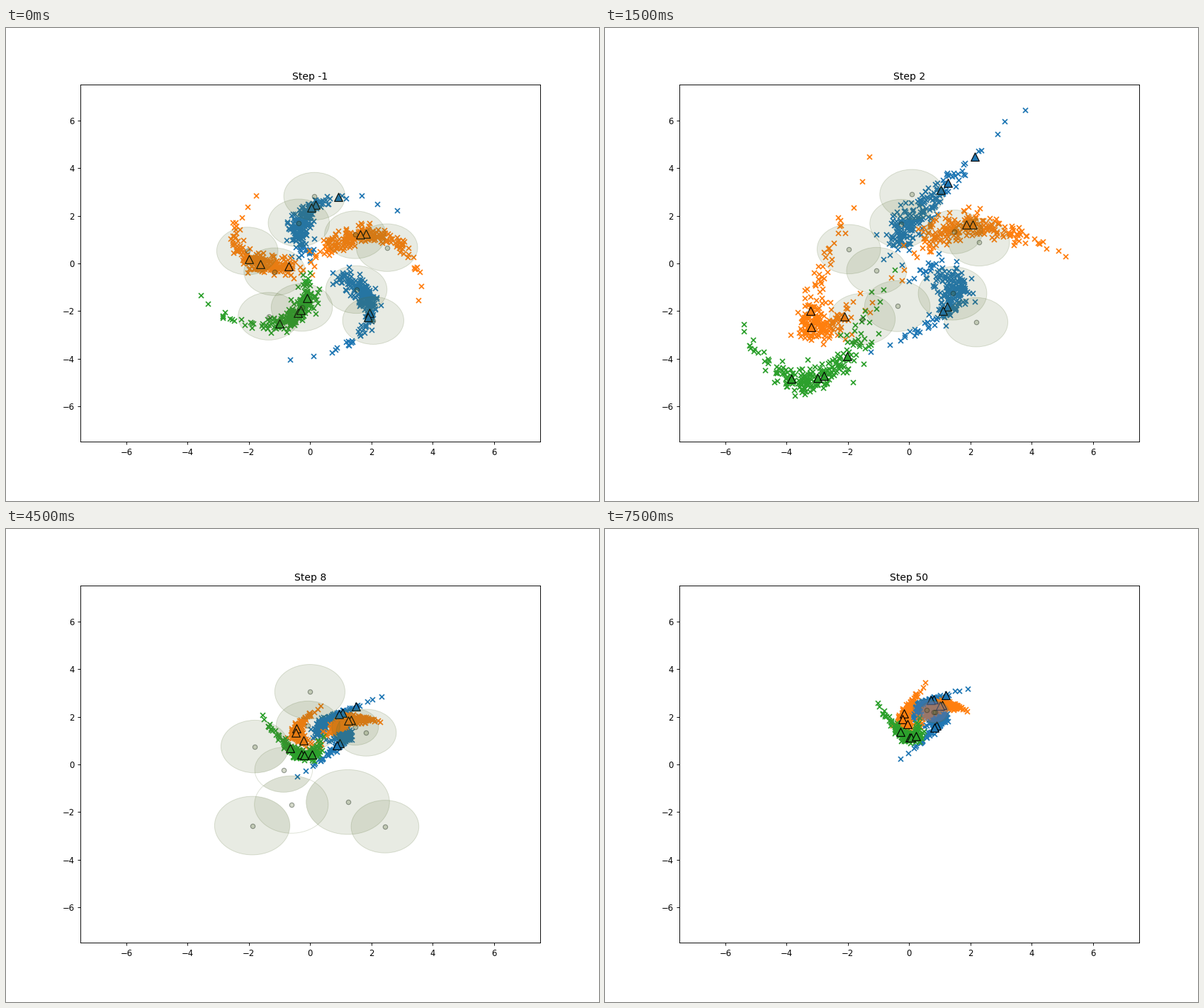
Animation, 837 px wide and 669 px high, one loop 8 s. Source, as a matplotlib script:

```python
import numpy as np
import matplotlib.pyplot as plt
from matplotlib.animation import FuncAnimation
from matplotlib.patches import Circle

W, H, DPI = 837, 669, 83.7
STEPS = list(range(-1, 11)) + [20, 30, 40, 50]
BURST, FOLD, LAST, FINAL = 2, 5, 11, 13    # frames where the motion changes
NODES = (-2, 0, 2.5)                       # where a curve meets its three points
BLUE, ORANGE, GREEN = "#1f77b4", "#ff7f0e", "#2ca02c"
OLIVE, SLATE = (0.33, 0.42, 0.18), (0.4, 0.45, 0.6)
FILL = 0.135

rng = np.random.default_rng(7)


def lerp(a, b, t):
    return a + (b - a) * t


class Arm:
    """One pinwheel arm; z is a normal variable running out along it."""

    def __init__(self, color, angle, radius, burst, fold, final, tips, n=205):
        self.color, self.angle, self.radius = color, angle, radius
        self.curves = [np.polyfit(NODES, p, 2) for p in (burst, fold, final)]
        self.tips = np.array(tips)
        self.z = np.append(np.clip(rng.normal(size=n), -2.5, 2.3), [2.6, 2.8])
        fade = 1 - 0.25 * np.clip(self.z, 0, 3)
        self.noise = rng.normal(size=(n + 2, 2)) * fade[:, None]

    def wheel(self, z):
        r = self.radius + 0.65 * z
        a = np.radians(self.angle - 14 * (np.exp(0.6 * z) - 1))
        return np.stack([r * np.cos(a), r * np.sin(a)], axis=1)

    def place(self, z, noise, i):
        burst, fold, final = (np.vander(z, 3) @ c for c in self.curves)
        burst = burst + 0.5 * noise
        fold = fold + 0.1 * noise
        final = final + 0.09 * noise
        if i <= BURST:
            return lerp(self.wheel(z) + 0.18 * noise, burst, i / BURST)
        if i <= FOLD:
            rest = (FOLD - i) / (FOLD - BURST)
            return lerp(burst, fold, 1 - rest ** 2)
        p = lerp(fold, final, np.interp(i, [FOLD, 7, LAST, FINAL], [0, 0.3, 0.65, 1]))
        p = p + [np.interp(i, [FOLD, 7, LAST, FINAL], [0, 0.15, 0.2, 0]),
                 np.interp(i, [FOLD, 7, LAST], [0, -0.15, 0])]
        x, y = p.T
        settled = np.stack([1.1 * x + 0.01, 1.07 * y + 0.2 * x - 0.17], axis=1)
        return lerp(p, settled, np.clip((i - FINAL) / 2, 0, 1))


class Ring:
    """A mixture component that drifts and swells, and empties at frame `life`."""

    def __init__(self, start, end, radius, life=99, goal=None):
        self.start, self.end = np.array(start), np.array(end)
        self.radius, self.life, self.goal = radius, life, goal

    def state(self, i):
        t = np.interp(i, [0, LAST, FINAL], [0, 1, 1.4])
        pos, r = lerp(self.start, self.end, t), lerp(1, self.radius, t)
        fill = FILL
        if self.goal and i > LAST:
            q = np.sqrt((i - LAST) / (len(STEPS) - 1 - LAST))
            pos = lerp(self.end, np.array(self.goal), q)
            r, fill = lerp(self.radius, 0.45, q), lerp(FILL, 0.3, q)
        if i > LAST and i > self.life:
            r = 0
        return *pos, r, 0 if i >= self.life else fill


ARMS = [
    Arm(BLUE, 99, 1.75, [(-.7, .8), (.1, 2.8), (4.5, 9.5)],
        [(0, .8), (.4, 1.4), (2.2, 2.8)],
        [(.2, 1.95), (.35, 2.4), (1.5, 2.75)], [1.8, 1.1, .9]),
    Arm(BLUE, -37, 2.25, [(-.3, -1.2), (2.1, -3.6), (-.7, -6.5)],
        [(.5, .8), (1.05, .85), (-.5, -.85)],
        [(.5, 1.75), (.95, 1.8), (0, .65)], [.9, 1.1]),
    Arm(ORANGE, 37, 2, [(.6, .4), (2.6, 1.7), (7.5, -1)],
        [(.5, 1), (1.2, 1.55), (2.3, 1.8)],
        [(.5, 2), (.9, 2.3), (1.6, 2)], [.3, .05]),
    Arm(ORANGE, 182, 1.55, [(-2, -2.6), (-5.8, -7.2), (-3.5, 5)],
        [(-.3, .35), (-1.05, .85), (-.3, 1.75)],
        [(.15, 1.75), (-.2, 1.95), (.35, 3.1)], [.7, .1, -1.3]),
    Arm(GREEN, 260, 2.05, [(-2.2, -4.2), (-5.5, -10.5), (-9, -8.5)],
        [(.05, .3), (-.8, -.2), (-2.3, 1.3)],
        [(.3, 1.6), (.02, 1.2), (-.85, 2.5)], [1, .1, -.1, -.9]),
]

RINGS = [
    Ring((.14, 2.82), (-.04, 3.1), 1.18, life=13),
    Ring((-.37, 1.7), (0, 1.6), 1.05, goal=(.58, 2.27)),
    Ring((1.47, 1.2), (1.47, 1.65), .71, goal=(.85, 2.2)),
    Ring((2.51, .66), (1.68, 1.48), .98, goal=(.8, 2.2)),
    Ring((-2.05, .52), (-1.75, .8), 1.13, life=13, goal=(-.2, 2.1)),
    Ring((-1.16, -.35), (-.8, -.2), .93, life=7),
    Ring((1.51, -1.1), (1.17, -1.69), 1.44, life=12),
    Ring((2.06, -2.4), (2.53, -2.66), 1.13, life=11),
    Ring((-1.35, -2.22), (-2.01, -2.65), 1.28, life=12),
    Ring((-.27, -1.85), (-.69, -1.65), 1.25, life=5),
]

fig = plt.figure(figsize=((W + 1e-6) / DPI, (H + 1e-6) / DPI), dpi=DPI,
                 facecolor="white")
ax = fig.add_axes([105 / W, 1 - 585.5 / H, 648.5 / W, 505.2 / H])


def draw_rings(i):
    late = STEPS[i] > 20
    tint = SLATE if STEPS[i] >= 40 else OLIVE
    live = [g.state(i) for g in RINGS if i <= max(g.life, FINAL)]
    for x, y, r, fill in live:
        faint = late and not fill
        ax.scatter([x], [y], s=30, color=[(*OLIVE, 0.12 if faint else 0.25)],
                   edgecolors=[(0.1, 0.15, 0.1, 0.15 if faint else 0.42)],
                   linewidths=1, zorder=4)
        if not r:
            continue
        ax.add_patch(Circle((x, y), r, fc=(*tint, fill) if fill else "none",
                            ec=(*OLIVE, 0.12 if faint else 0.2), lw=0.8, zorder=3))
        # an empty ring only shows where it crosses another one
        for ox, oy, other, _ in live:
            if not fill and 0 < np.hypot(x - ox, y - oy) < r + other:
                lens = Circle((x, y), r, fc=(*OLIVE, 0.1), ec="none", zorder=3)
                ax.add_patch(lens)
                lens.set_clip_path(Circle((ox, oy), other, transform=ax.transData))


def draw(i):
    ax.clear()
    ax.set(xlim=(-7.5, 7.5), ylim=(-7.5, 7.5),
           xticks=range(-6, 7, 2), yticks=range(-6, 7, 2))
    ax.set_title(f"Step {STEPS[i]}")
    for arm in ARMS:
        ax.scatter(*arm.place(arm.z, arm.noise, i).T, marker="x", s=36,
                   c=arm.color, linewidths=1.5, zorder=1)
        ax.scatter(*arm.place(arm.tips, 0, i).T, marker="^", s=100,
                   c=arm.color, edgecolors="black", linewidths=1, zorder=2)
    draw_rings(i)
    return []


anim = FuncAnimation(fig, draw, frames=len(STEPS), interval=500,
                     init_func=lambda: [], repeat=True, repeat_delay=0)
plt.show()
```
